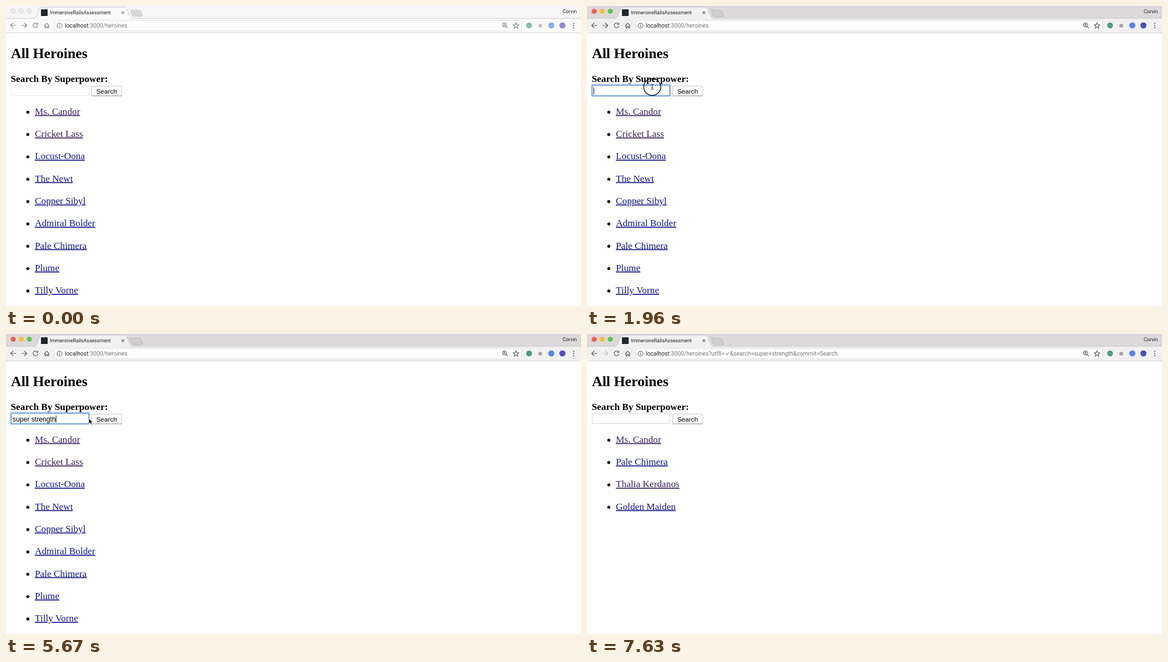
These frames come from a looping animation (1036 px wide and 541 px high, 7700 ms). An HTML page:

```html
<!DOCTYPE html>
<html lang="en">
<head>
<meta charset="utf-8">
<title>All Heroines</title>
<style>
html, body { margin: 0; width: 100%; height: 100%; overflow: hidden; background: #fff }
svg { display: block }
text { white-space: pre }
.ui { font-family: Roboto, Inter, sans-serif }
.page { font-family: "Liberation Serif", "Times New Roman", serif; font-size: 17.25px }
.form { font-family: "Liberation Sans", Arial, sans-serif; font-size: 12.2px }
.link { fill: #14148c; text-decoration: underline }
.seen { fill: #39205f }
.line { fill: none; stroke: #5c5c5c; stroke-width: 1.2 }
.idle .line { stroke: #858585 }
.idle .ext { opacity: .65 }
.idle .light { fill: #e9e9e9; stroke: #d9d9d9 }
#strip { fill: #dcd9db }
.idle #strip { fill: #f6f6f6 }
#tab, #bar { fill: #f2f1f2 }
.idle #tab, .idle #bar { fill: #fafafa }
#newTab { fill: #d0cdcf; stroke: #b3b0b2 }
.idle #newTab { fill: #d9d9d9; stroke: #cfcfcf }
</style>
</head>
<body>
<svg id="stage" width="1036" height="541" viewBox="0 0 1036 541">
  <rect width="1036" height="541" fill="#fff"/>
  <g class="ui">
    <rect id="strip" width="1036" height="23"/>
    <rect id="bar" y="22" width="1036" height="26.5"/>
    <path d="M0 22.5H50M229 22.5H1036" stroke="#c6c4c5" stroke-width=".8"/>
    <path d="M0 48.5H1036" stroke="#d2d2d2"/>
    <path id="tab" d="M50 23C54 22 55 20 57 14L60 5Q61 2 64 2H214Q217 2 218 5L222 16Q224 22 229 23" stroke="#bdbbbc" stroke-width=".8"/>
    <path id="newTab" d="M225 7.5H241Q242 7.5 243 9L246 17Q247 19 245 19H230Q228 19 227 17L224 9Q223 7.5 225 7.5Z" stroke-width=".8"/>
    <g stroke-width=".6">
      <circle class="light" cx="13" cy="9.5" r="4.6" fill="#ee6156"/>
      <circle class="light" cx="27.5" cy="9.5" r="4.6" fill="#f5bd3f"/>
      <circle class="light" cx="42" cy="9.5" r="4.6" fill="#5fc454"/>
    </g>
    <rect id="favicon" x="63" y="6" width="12" height="12" fill="#1f2630"/>
    <path id="spinner" d="M71.5 7.7A5 5 0 0 1 74 12.5" fill="none" stroke="#4c64c8" stroke-width="1.5"/>
    <text x="79" y="15.3" font-size="8.9" fill="#222">ImmersiveRailsAssessment</text>
    <path class="line" d="M208.3 9.7L213 14.4M213 9.7L208.3 14.4"/>
    <text x="1003" y="13" font-size="8.9" fill="#222">Corvin</text>

    <path class="line" d="M18 35H8.5M13 30.5L8.5 35L13 39.5"/>
    <path id="forward" class="line" d="M28 35H37.5M33 30.5L37.5 35L33 39.5"/>
    <path id="reload" class="line" d="M56.4 32A4.3 4.3 0 1 0 57.4 36M57.4 30.3V33.5H54"/>
    <path id="stop" class="line" d="M49.5 31L57.5 39M57.5 31L49.5 39"/>
    <path class="line" d="M68.8 35.7L73.5 31L78.2 35.7M70.3 35V39.5H72.3V36.5H74.7V39.5H76.7V35"/>
    <rect x="87" y="25.8" width="841.5" height="19.2" rx="2" fill="#fff" stroke="#d9d9d9"/>
    <circle class="line" cx="96.5" cy="35.5" r="4.5"/>
    <path class="line" d="M96.5 34.8V38M96.5 32.5V33.7"/>
    <text x="106" y="39.2" font-size="10.45" fill="#777"><tspan fill="#222">localhost</tspan>:3000/heroines<tspan id="query"></tspan></text>
    <circle class="line" cx="898" cy="34" r="3.4"/>
    <path class="line" d="M900.5 36.5L904 40M896.3 34H899.7M898 32.3V35.7"/>
    <path class="line" d="M919 30.3L920.4 33.7L924 34L921.2 36.4L922.1 40L919 38L915.9 40L916.8 36.4L914 34L917.6 33.7Z"/>
    <g class="ext">
      <circle cx="942.5" cy="35" r="5.3" fill="#4e9b83"/>
      <circle cx="962.5" cy="35.5" r="3.6" fill="#a9a9a9"/>
      <circle cx="982.5" cy="35" r="5.5" fill="#5585e8"/>
      <circle cx="1002.5" cy="35" r="5.5" fill="#5350b5"/>
    </g>
    <g fill="#5c5c5c">
      <circle cx="1023" cy="31.3" r="1.1"/><circle cx="1023" cy="35.2" r="1.1"/><circle cx="1023" cy="39.1" r="1.1"/>
    </g>
  </g>

  <g class="page">
    <text x="9" y="94" font-size="25.8" font-weight="bold">All Heroines</text>
    <text x="8.5" y="137.3" font-weight="bold">Search By Superpower:</text>
    <g id="list"></g>
  </g>
  <g class="form">
    <rect id="field" x="9.5" y="143" width="139.5" height="18.5" fill="#fff"/>
    <g id="focus" fill="none">
      <rect x="8.8" y="142.3" width="141" height="20" rx="1.5" stroke="#a9c7f3" stroke-width="3"/>
      <rect x="9.5" y="143" width="139.5" height="18.5" stroke="#6f9fe4" stroke-width="1.3"/>
    </g>
    <text id="typed" x="11.8" y="157.5"></text>
    <path id="caret" d="M0 147V159.5" stroke="#000"/>
    <rect x="154.5" y="144.5" width="53.5" height="17.5" fill="#fff" stroke="#c4c4c4"/>
    <path d="M154 162H208.5" stroke="#a2a2a2"/>
    <text id="button" x="162.7" y="157.7" font-size="11.8">Search</text>
  </g>
  <g id="mouse">
    <circle id="ring" r="15.3" fill="none" stroke="#111" stroke-width="1.4"/>
    <path id="arrow" d="M0 0V9.6L2.2 7.6L3.8 11.2L5.4 10.5L3.9 7H7Z" fill="#000" stroke="#fff" stroke-width=".7"/>
    <path id="beam" d="M-2.2 -5Q0 -5 0 -3.5Q0 -5 2.2 -5M0 -4V4M-2.2 5Q0 5 0 3.5Q0 5 2.2 5M-1.2 1.5H1.2" fill="none" stroke="#222"/>
  </g>
</svg>
<script>
const LOOP = 7700;
const ACTIVATE = 1600, FOCUS = 1880, BLUR = 5930, SUBMIT = 6080, LOADED = 6220;
const PHRASE = "super strength";
const KEYS = [2440, 2510, 2640, 2720, 2860, 2930, 3070, 3140, 3280, 3630, 3910, 4200, 5230, 5380];
const ALL = ["*Ms. Candor", "*Cricket Lass", "Locust-Oona", "The Newt", "Copper Sibyl",
  "Admiral Bolder", "Pale Chimera", "Plume", "Tilly Vorne"];
const STRONG = ["*Ms. Candor", "Pale Chimera", "*Thalia Kerdanos", "Golden Maiden"];
const QUERY = "?utf8=✓&search=super+strength&commit=Search";
// Pointer stops: time, x, y
const PATH = [[1050, 330, 560], [1450, 117.5, 146], [5500, 117.5, 146], [5850, 183.5, 159.5],
  [6780, 183.5, 159.5], [7400, 250, 560]];

const $ = id => document.getElementById(id);
const show = (id, on) => $(id).setAttribute("visibility", on ? "visible" : "hidden");
const within = (t, a, b) => t >= a && t < b;

// A leading * marks a visited link.
const rows = names => names.map((name, i) => {
  const y = 195.7 + i * 40.3, seen = name[0] === "*";
  return `<circle cx="39.3" cy="${y - 4.2}" r="2.7"/>
    <text x="52" y="${y}" class="link${seen ? " seen" : ""}">${name.slice(seen)}</text>`;
}).join("");

function pointer(t) {
  const next = PATH.findIndex(p => p[0] > t);
  if (next < 1) return PATH[0].slice(1);
  const [t0, x0, y0] = PATH[next - 1], [t1, x1, y1] = PATH[next];
  const u = (t - t0) / (t1 - t0), k = u * u * (3 - 2 * u);
  return [x0 + (x1 - x0) * k, y0 + (y1 - y0) * k];
}

let shownList;
function draw(t) {
  const sent = t >= SUBMIT, loaded = t >= LOADED, focused = within(t, FOCUS, BLUR);
  $("stage").setAttribute("class", t < ACTIVATE ? "idle" : "");

  const names = loaded ? STRONG : ALL;
  if (names !== shownList) $("list").innerHTML = rows(shownList = names);

  const count = KEYS.filter(k => k <= t).length;
  $("typed").textContent = loaded ? "" : PHRASE.slice(0, count);
  show("focus", focused);
  $("field").setAttribute("stroke", t < ACTIVATE ? "#ececec" : "#d8d8d8");
  const since = t - (count ? KEYS[count - 1] : FOCUS);
  show("caret", focused && since % 1000 < 500);
  const end = count ? $("typed").getComputedTextLength() : 0;
  $("caret").setAttribute("transform", `translate(${12.3 + end})`);
  $("button").setAttribute("fill", sent && !loaded ? "#858585" : "#000");

  const busy = within(t, SUBMIT, 6430);
  $("query").textContent = sent ? QUERY : "";
  show("favicon", !busy);
  show("spinner", busy);
  $("spinner").setAttribute("transform", `rotate(${(t - 6160) * .5} 69 12)`);
  const stopping = within(t, SUBMIT, 6290);
  show("stop", stopping);
  show("reload", !stopping);
  $("forward").setAttribute("opacity", sent ? .35 : 1);

  const [x, y] = pointer(t);
  $("mouse").setAttribute("transform", `translate(${x} ${y})`);
  const beam = within(t, FOCUS, KEYS[0]);
  show("beam", beam);
  show("arrow", within(t, 1050, FOCUS) || within(t, 5500, 7400));
  show("ring", within(t, 1520, 2030) || within(t, 5860, SUBMIT));
}

function tick() {
  draw(performance.now() % LOOP);
  requestAnimationFrame(tick);
}
tick();
</script>
</body>
</html>
```
